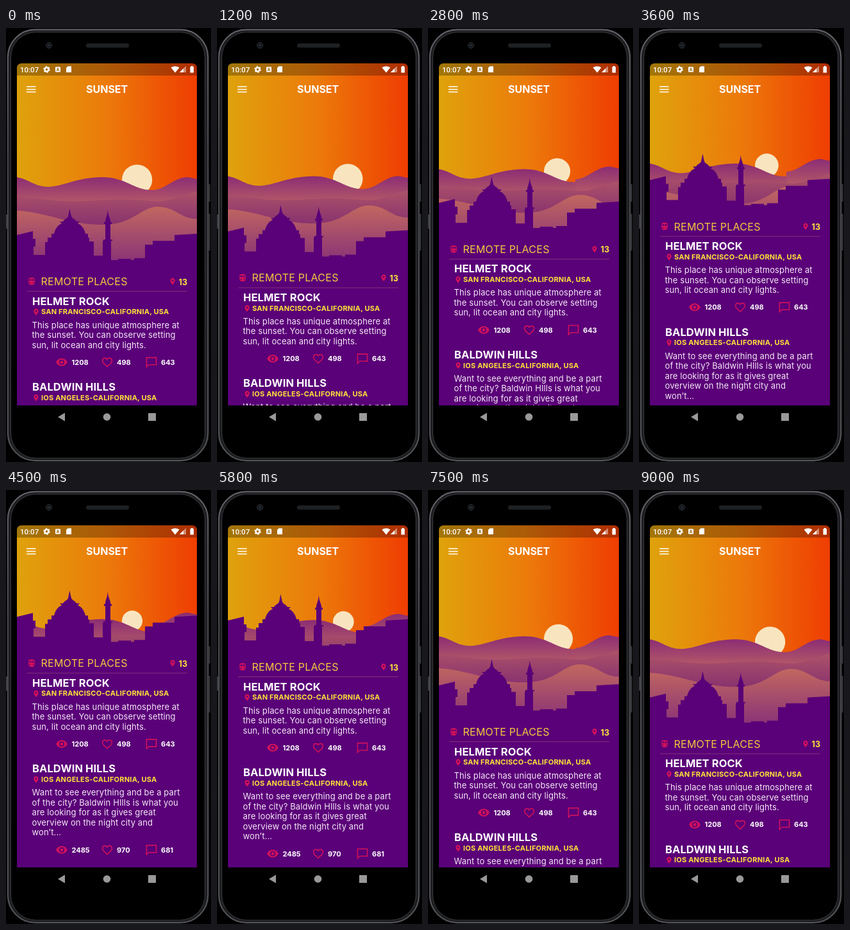
Write an HTML page that moves like this. It is 320 by 675 pixels and loops after 9100 ms.

```html
<!DOCTYPE html>
<html lang="en">
<head>
<meta charset="utf-8">
<title>Sunset</title>
<style>
html, body { margin: 0; width: 100%; height: 100%; overflow: hidden; background: #000; }
svg { display: block; width: 100%; height: 100%; }
text { font-family: Inter, "Open Sans", sans-serif; fill: #fff; }
.bold { font-weight: 700; }
.name { font-size: 16.5px; letter-spacing: .1px; }
.place { font-size: 11px; letter-spacing: .22px; fill: #ffe33a; }
.body { font-size: 13px; letter-spacing: .12px; fill: #f3e8f6; }
.count { font-size: 11px; }
.icon { fill: #cf115c; fill-rule: evenodd; }
.line { fill: none; stroke: #cf115c; stroke-width: 2; }
</style>
</head>
<body>
<svg viewBox="0 0 320 675">
  <defs>
    <linearGradient id="sky">
      <stop stop-color="#dfa20c"/><stop offset=".5" stop-color="#ec7a0a"/><stop offset="1" stop-color="#ef3d02"/>
    </linearGradient>
    <linearGradient id="far" gradientUnits="userSpaceOnUse" x1="0" y1="232" x2="0" y2="278">
      <stop stop-color="#8c2d74"/><stop offset="1" stop-color="#b95f66"/>
    </linearGradient>
    <linearGradient id="mid" gradientUnits="userSpaceOnUse" x1="0" y1="258" x2="0" y2="310">
      <stop stop-color="#aa5069"/><stop offset="1" stop-color="#86306f"/>
    </linearGradient>
    <linearGradient id="near" gradientUnits="userSpaceOnUse" x1="0" y1="278" x2="0" y2="362">
      <stop stop-color="#c16760"/><stop offset="1" stop-color="#8b3476"/>
    </linearGradient>
    <linearGradient id="rim" x2="0" y2="1">
      <stop stop-color="#6a666e"/><stop offset=".3" stop-color="#4b4b50"/><stop offset="1" stop-color="#55575a"/>
    </linearGradient>
    <clipPath id="screen"><path d="M17 587V63Q17 55 25 55H290Q298 55 298 63V587Z"/></clipPath>
    <path id="pin" class="icon" d="M12 2C8 2 5 5 5 9c0 5.3 7 13 7 13s7-7.7 7-13c0-4-3-7-7-7zm0 9.5a2.5 2.5 0 010-5 2.5 2.5 0 010 5z"/>
    <path id="train" class="icon" d="M12 2c-4 0-8 .5-8 4v9.5C4 17.4 5.6 19 7.5 19L6 20.5v.5h12v-.5L16.5 19c1.9 0 3.5-1.6 3.5-3.5V6c0-3.5-3.6-4-8-4zM7.5 17a1.5 1.5 0 110-3 1.5 1.5 0 010 3zM11 10H6V6h5zm2 0V6h5v4zm3.5 7a1.5 1.5 0 110-3 1.5 1.5 0 010 3z"/>
    <path id="eye" class="icon" d="M12 4.5C7 4.5 2.7 7.6 1 12c1.7 4.4 6 7.5 11 7.5s9.3-3.1 11-7.5c-1.7-4.4-6-7.5-11-7.5zM12 17a5 5 0 010-10 5 5 0 010 10zm0-8a3 3 0 000 6 3 3 0 000-6z"/>
    <path id="heart" class="line" d="M12 20.5L4.5 13.5C1 9.5 3 4 7.5 4 9.5 4 11 5 12 6.5 13 5 14.5 4 16.5 4 21 4 23 9.5 19.5 13.5Z"/>
    <path id="chat" class="line" d="M2.5 3H21.5V17H6.5L2.5 21Z"/>
  </defs>

  <!-- phone -->
  <path d="M317.5 243V270M317.5 289V346M1 290V312" stroke="#3a3c3f" stroke-width="2"/>
  <rect x="2.8" y="2.5" width="312.5" height="670.5" rx="43" fill="#1d1e20" stroke="url(#rim)" stroke-width="2"/>
  <rect x="7.5" y="6.5" width="303" height="662.5" rx="39" fill="#000" stroke="#3a3b3e"/>
  <rect x="125" y="24" width="67" height="6.5" rx="3.2" fill="#1e2022"/>
  <circle cx="67" cy="27" r="4.5" fill="#14171b" stroke="#2b2e32"/>
  <circle cx="67" cy="27" r="1.6" fill="#27313b"/>

  <g clip-path="url(#screen)">
    <rect x="17" y="55" width="281" height="532" fill="url(#sky)"/>
    <circle id="sun" fill="#f8e5bf"/>
    <g id="hills"></g>
    <g id="list">
      <path fill="#5a0078" d="M17 322L42 316V328H46V340H43V353H61V333H65V326H71V320H75C77 311 82 306 87 304L84 301H89C91 297 95 297 97 293L98 288 99.4 281 100.8 288 102 293C104 297 108 297 110 301H115L112 304C117 306 122 311 124 320H128V326H130V332H137V354H151V331H152V329H155V305H153V302H155V299L158 289 158.8 283 159.6 289 163 299V302H165V305H163V329H166V331H164V361H175V359H195V361H200V358H217V337H229V331H263V322L298 320V1000H17Z"/>
      <use href="#train" transform="translate(32.8 387)scale(.6)"/>
      <text x="54.5" y="400" font-size="16" letter-spacing=".25" style="fill:#f5c93f">REMOTE PLACES</text>
      <use href="#pin" transform="translate(253.8 388)scale(.52)"/>
      <text x="269.5" y="399.5" font-size="12.5" class="bold" style="fill:#ffe33a">13</text>
      <path d="M33 409.5H283" stroke="#80337c"/>
    </g>

    <rect x="17" y="55" width="281" height="19" opacity=".27"/>
    <text x="22" y="69" style="font:500 11.5px Roboto, sans-serif">10:07</text>
    <g fill="#fff">
      <circle cx="63.5" cy="64.5" r="3" fill="none" stroke="#fff" stroke-width="2.4"/>
      <circle cx="63.5" cy="64.5" r="4.6" fill="none" stroke="#fff" stroke-width="1.4" stroke-dasharray="2.4 2.417"/>
      <rect x="77" y="60.5" width="8" height="8" rx="1"/>
      <path d="M79 67L81 62 83 67M79.8 65.5H82.2" fill="none" stroke="#a06a12"/>
      <path d="M96.5 59.5H102V69H94V62Z"/>
      <path d="M257.5 61.5Q264 57.5 270.5 61.5L264 69.5Z"/>
      <path d="M281 59V69H271Z" opacity=".45"/><path d="M277 63V69H271Z"/>
      <path d="M289 59H291.5V60.2H293V69.5H287.5V60.2H289Z"/>
    </g>
    <path d="M32 91.3H46.5M32 95.4H46.5M32 99.5H46.5" stroke="#fff" stroke-width="1.5"/>
    <text x="125" y="101" font-size="16" class="bold">SUNSET</text>
  </g>

  <g fill="#999">
    <path d="M81 605L92 598.5V611.5Z"/>
    <circle cx="157.5" cy="605" r="5.8"/>
    <rect x="222" y="599" width="12" height="12" rx=".5"/>
  </g>
</svg>
<script>
const $ = id => document.getElementById(id);

const text = (x, y, cls, s) => `<text x="${x}" y="${y}" class="${cls}">${s}</text>`;
const icon = (id, x, y, k) => `<use href="#${id}" transform="translate(${x - 12 * k} ${y - 12 * k})scale(${k})"/>`;

function entry(y, name, place, lines, counts) {
  const row = y + 43.2 + lines.length * 15.6;
  return text(41, y, 'bold name', name)
    + icon('pin', 47, y + 11.2, .52)
    + text(55, y + 14.7, 'bold place', place)
    + lines.map((s, i) => text(40.5, y + 36 + i * 15.5, 'body', s)).join('')
    + ['eye', 'heart', 'chat'].map((id, i) =>
        icon(id, [87, 158, 227][i], row - .7, .8)
        + text([102.5, 173, 242][i], row + 3.3, 'bold count', counts[i])).join('');
}

$('list').innerHTML +=
  entry(430.5, 'HELMET ROCK', 'SAN FRANCISCO-CALIFORNIA, USA', [
    'This place has unique atmosphere at',
    'the sunset. You can observe setting',
    'sun, lit ocean and city lights.'], [1208, 498, 643]) +
  entry(564, 'BALDWIN HILLS', 'lOS ANGELES-CALIFORNIA, USA', [
    'Want to see everything and be a part',
    'of the city? Baldwin HIlls is what you',
    'are looking for as it gives great',
    'overview on the night city and',
    'won’t...'], [2485, 970, 681]);

// Outline, share of the scroll it follows, fill
const hills = [
  ['M17 232C35 235 45 247 66 247S112 232 150 232S200 253 230 252H298', .25, 'far'],
  ['M230 252C250 251 262 232 284 232L298 235', .33, 'far'],
  ['M17 262C60 266 90 272 130 269S190 266 225 269S270 260 298 254', .32, 'mid'],
  ['M17 284C60 286 100 306 150 306S210 278 237 278S272 297 298 297', .37, 'near'],
].map(([d, rate, fill]) => {
  const x = d.match(/^M(\d+)/)[1];
  $('hills').insertAdjacentHTML('beforeend', `<path d="${d}V480H${x}Z" fill="url(#${fill})"/>`);
  return { el: $('hills').lastChild, rate };
});

// Time and scroll offset
const keys = [[0, 0], [1000, 3], [2000, 22], [3000, 58], [3600, 85.5], [4000, 108], [4500, 124.7],
  [5100, 127], [5800, 119], [6000, 113], [6600, 65], [7200, 29], [8000, 6], [9000, -.7], [9100, -.7]];

function slope(i) {
  const a = keys[Math.max(i - 1, 0)], b = keys[Math.min(i + 1, keys.length - 1)];
  return (b[1] - a[1]) / (b[0] - a[0]);
}

function scrollAt(t) {
  const i = keys.findIndex(k => k[0] > t) - 1;
  const [t0, a] = keys[i], [t1, b] = keys[i + 1];
  const d = t1 - t0, u = (t - t0) / d, v = 1 - u;
  return v * v * (1 + 2 * u) * a + u * u * (3 - 2 * u) * b + d * u * v * (v * slope(i) - u * slope(i + 1));
}

function draw(now) {
  const s = scrollAt(Math.floor(now % 9100 / 100) * 100);
  const shift = (el, y) => el.setAttribute('transform', `translate(0 ${-y})`);
  shift($('list'), s);
  hills.forEach(h => shift(h.el, s * h.rate));
  // The sun shrinks towards its left edge while it rises
  const r = 23.6 - .061 * s;
  $('sun').setAttribute('cx', 181 + r);
  $('sun').setAttribute('cy', 212.4 - .2 * s + r);
  $('sun').setAttribute('r', r);
}

const start = performance.now();
function tick() {
  draw(performance.now() - start);
  requestAnimationFrame(tick);
}
tick();
</script>
</body>
</html>
```
